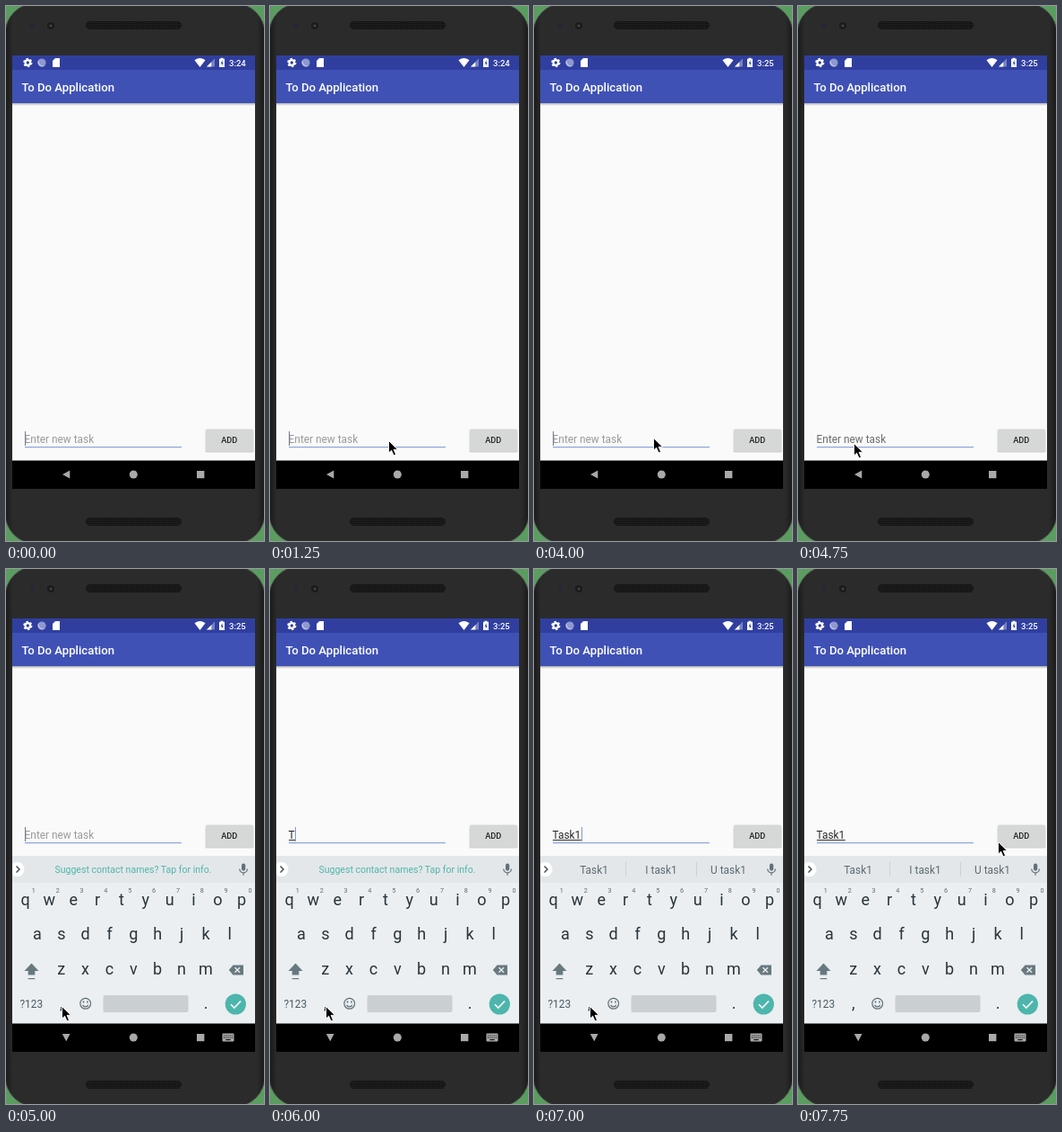
Animation of 288x595 px, one loop 8000 ms. Source, as an HTML page:

```html
<!DOCTYPE html>
<html lang="en">
<head>
<meta charset="utf-8">
<title>To Do Application</title>
<style>
  html, body { margin: 0; width: 100%; height: 100%; overflow: hidden; background: #5b9c60; }
  svg { display: block; width: 288px; height: 595px; font-family: Roboto, sans-serif; }
  .medium { font-weight: 500; }
  .body { font-size: 11.86px; }
  .key { font-size: 18px; fill: #27343a; }
  .digit { font-size: 7.2px; fill: #5d6a70; }
  .mid { text-anchor: middle; }
</style>
</head>
<body>
<svg viewBox="0 0 288 595">
  <defs>
    <linearGradient id="shell">
      <stop offset="0" stop-color="#191919"/>
      <stop offset=".03" stop-color="#2b2b2b"/>
      <stop offset=".97" stop-color="#2b2b2b"/>
      <stop offset="1" stop-color="#191919"/>
    </linearGradient>
    <linearGradient id="shade" x2="0" y2="1">
      <stop offset="0" stop-opacity=".3"/>
      <stop offset="1" stop-opacity="0"/>
    </linearGradient>
    <pattern id="mesh" width="2" height="2" patternUnits="userSpaceOnUse">
      <rect width="2" height="2" fill="#141414"/>
      <rect width="1" height="1" fill="#262626"/>
    </pattern>
    <clipPath id="screen"><rect x="7" y="55" width="271" height="482"/></clipPath>
  </defs>

  <!-- phone -->
  <rect x="-1" y="-3" width="290" height="601" rx="34" fill="url(#shell)" stroke="#4a4a4a"/>
  <rect x="89" y="17" width="107" height="9" rx="4.5" fill="url(#mesh)"/>
  <rect x="89" y="569" width="107" height="9" rx="4.5" fill="url(#mesh)"/>
  <circle cx="50" cy="22" r="4" fill="#1b1b1d"/>
  <circle cx="50" cy="22" r="1.5" fill="#45454c"/>
  <circle cx="29" cy="22" r="2" fill="#242440"/>

  <g clip-path="url(#screen)">
    <rect x="7" y="55" width="271" height="482" fill="#fafafa"/>
    <rect x="7" y="108" width="271" height="3" fill="url(#shade)"/>
    <rect x="7" y="55" width="271" height="16" fill="#303f9f"/>
    <rect x="7" y="71" width="271" height="37" fill="#3f51b5"/>
    <text class="medium" x="17.5" y="94.5" font-size="13.18" fill="#fff">To Do Application</text>

    <!-- status icons -->
    <g fill="#fff">
      <circle cx="24.3" cy="63" r="2.8" fill="none" stroke="#fff" stroke-width="2.2"/>
      <circle cx="24.3" cy="63" r="4.3" fill="none" stroke="#fff" stroke-width="1.7" stroke-dasharray="2.25"/>
      <circle cx="40" cy="63" r="4.6" fill="#8e98cf"/>
      <path d="M37 59.5A4.6 4.6 0 0 0 43.5 66A5 5 0 0 1 37 59.5" fill="#c5cae9"/>
      <path d="M55 58h5v10h-8v-7z"/>
      <path d="M210.5 60.2Q216.5 56 222.5 60.2L216.5 68z"/>
      <path d="M233 58.5V67.5H224z" opacity=".35"/>
      <path d="M229.3 62.2V67.5H224z"/>
      <path d="M239.6 58.8V57.8H242.4V58.8H244V68H238V58.8z"/>
      <path d="M241.6 60.3L239.6 63.8H240.8V66.6L242.6 63H241.5z" fill="#303f9f"/>
      <text id="clock" class="medium" x="249" y="66.6" font-size="9.5"></text>
    </g>

    <!-- input row -->
    <g id="row">
      <rect x="21" y="490" width="175" height="1.2" fill="#8ba3dc"/>
      <text id="field" class="body" x="20.6" y="485.8"></text>
      <rect id="compose" x="21" y="487" height="1" fill="#333"/>
      <rect id="caret" y="473" width="1" height="16"/>
      <rect x="222.5" y="471.5" width="54" height="25" rx="1.5" opacity=".16"/>
      <rect x="223" y="470.5" width="53" height="24.5" rx="1.5" fill="#d6d7d7"/>
      <text class="medium mid" x="249.3" y="486.2" font-size="9.2" fill="#212121">ADD</text>
    </g>

    <!-- keyboard -->
    <g id="keyboard">
      <rect x="7" y="319" width="271" height="187" fill="#eceff1"/>
      <rect x="7" y="319" width="271" height="30" fill="#e4e7e9"/>
      <circle cx="12.5" cy="334" r="8" fill="#fff"/>
      <path d="M11.5 330.5L15 334L11.5 337.5" fill="none" stroke="#37474f" stroke-width="1.4"/>
      <text id="tip" class="mid" x="142" y="338.4" font-size="10.55" fill="#4db6ac">Suggest contact names? Tap for info.</text>
      <g id="words" class="body mid" fill="#5a6a72">
        <path d="M102.5 326V342M181.5 326V342" stroke="#cdd2d5"/>
        <text x="67" y="338.6"></text>
        <text x="142" y="338.6"></text>
        <text x="217" y="338.6"></text>
      </g>
      <rect x="263" y="327.5" width="4.2" height="8.2" rx="2.1" fill="#607078"/>
      <path d="M260.8 333.5a4.3 4.3 0 0 0 8.6 0M265.1 338V340.8" fill="none" stroke="#607078" stroke-width="1.2"/>
      <g id="keys"></g>
      <path d="M28.5 438.5L36.5 447H32.3V451.5H24.7V447H20.5z" fill="#687980"/>
      <rect x="24.7" y="455" width="7.6" height="1.2" fill="#687980"/>
      <path d="M253.5 440.5H265V451.5H253.5L248.8 446z" fill="#687980"/>
      <path d="M255.5 443.3L261 448.8M261 443.3L255.5 448.8" stroke="#eceff1" stroke-width="1.3"/>
      <text class="body" x="15.5" y="487.6" fill="#455a64">?123</text>
      <g fill="none" stroke="#5d6f77" stroke-width="1.2">
        <circle cx="88.7" cy="483.3" r="5.9"/>
        <path d="M85.6 484.8a3.3 3.3 0 0 0 6.2 0"/>
        <path d="M86.5 480.6v1.8M90.9 480.6v1.8" stroke-width="1.5"/>
      </g>
      <rect x="108.5" y="474" width="95" height="19" rx="2" fill="#cacfd2"/>
      <circle cx="256.3" cy="484" r="11.6" fill="#4db6ac"/>
      <path d="M251 484.3L254.8 488L262 480.6" fill="none" stroke="#fff" stroke-width="1.6"/>
    </g>

    <!-- navigation bar -->
    <rect x="7" y="505.5" width="271" height="32"/>
    <g fill="#a9a9a9">
      <path id="back" d="M63 521L71.3 516.6V525.4z"/>
      <circle cx="142.3" cy="521" r="4.5"/>
      <rect x="213" y="517" width="8.4" height="8.2"/>
      <g id="switcher">
        <rect x="241.5" y="516.5" width="13" height="9" rx="1"/>
        <path d="M243 519h10M243 521.3h10" stroke="#000" stroke-dasharray="1.1 1.1"/>
        <path d="M245.3 523.6h5.4" stroke="#000"/>
      </g>
    </g>
  </g>

  <path id="pointer" d="M0 .5V14L3.1 11.2L5.6 16.8L8 15.8L5.6 10.3H10z" fill="#000" stroke="#fff" stroke-width=".9"/>
</svg>
<script>
const LOOP = 8000;
const $ = id => document.getElementById(id);
const show = (id, on) => $(id).style.display = on ? '' : 'none';

// [start time, value] steps
const pointerSteps = [
  [0, null], [750, [273, 441]], [1000, [152, 467]], [1250, [132, 483]], [1500, [133, 480]],
  [4500, [62, 488]], [4750, [62, 486]], [7250, [119, 474]], [7500, [163, 387]], [7750, [223, 303]]
];
const wordSteps = [
  [0, null],
  [6500, ['Tas', 'Task', 'Tasks']],
  [6750, ['Task', 'Tasks', 'Tasked']],
  [7000, ['Task1', 'I task1', 'U task1']]
];
const at = (steps, t) => steps.filter(s => s[0] <= t).pop()[1];

function addKeys() {
  const label = (cls, x, y, s) => `<text class="${cls} mid" x="${x}" y="${y}">${s}</text>`;
  const rows = [['qwertyuiop', 21.5, 373.5], ['asdfghjkl', 35, 412], ['zxcvbnm', 61.7, 451.3]];
  let out = label('key', 61.8, 488.5, ',') + label('key', 223, 488.5, '.');
  rows.forEach(([letters, x0, y], r) => [...letters].forEach((c, i) => {
    const x = x0 + i * 26.85;
    out += label('key', x, y, c);
    if (r === 0) out += label('digit', x + 9.3, 360, (i + 1) % 10);
  }));
  $('keys').innerHTML = out;
}

function draw(t) {
  const open = t >= 5000;
  const typed = t < 6000 ? '' : 'Task1'.slice(0, 1 + Math.floor((t - 6000) / 250));
  const field = $('field');

  $('clock').textContent = t < 2500 ? '3:24' : '3:25';
  $('row').setAttribute('transform', `translate(0 ${open ? -186 : 0})`);

  field.textContent = typed || 'Enter new task';
  const pressed = t >= 4750 && !open;
  field.setAttribute('fill', typed ? '#262626' : pressed ? '#6c6c6c' : '#9a9a9a');
  const width = typed ? field.getComputedTextLength() : 0;
  $('compose').setAttribute('width', width);
  $('caret').setAttribute('x', 21 + Math.round(width));
  $('caret').setAttribute('fill', typed ? '#7f97d8' : '#74798c');
  show('caret', Math.floor(t / 500) % 2 === 0 || (t >= 6000 && t < 7500));

  show('keyboard', open);
  show('switcher', open);
  $('back').setAttribute('transform', open ? 'rotate(-90 67.2 521)' : '');
  const words = at(wordSteps, t);
  show('tip', !words);
  show('words', words);
  if (words) $('words').querySelectorAll('text').forEach((e, i) => e.textContent = words[i]);

  const p = at(pointerSteps, t);
  show('pointer', p);
  if (p) $('pointer').setAttribute('transform', `translate(${p[0] + .5} ${p[1]})`);
}

addKeys();
const start = performance.now();
function tick() {
  draw((performance.now() - start) % LOOP);
  requestAnimationFrame(tick);
}
tick();
</script>
</body>
</html>
```
